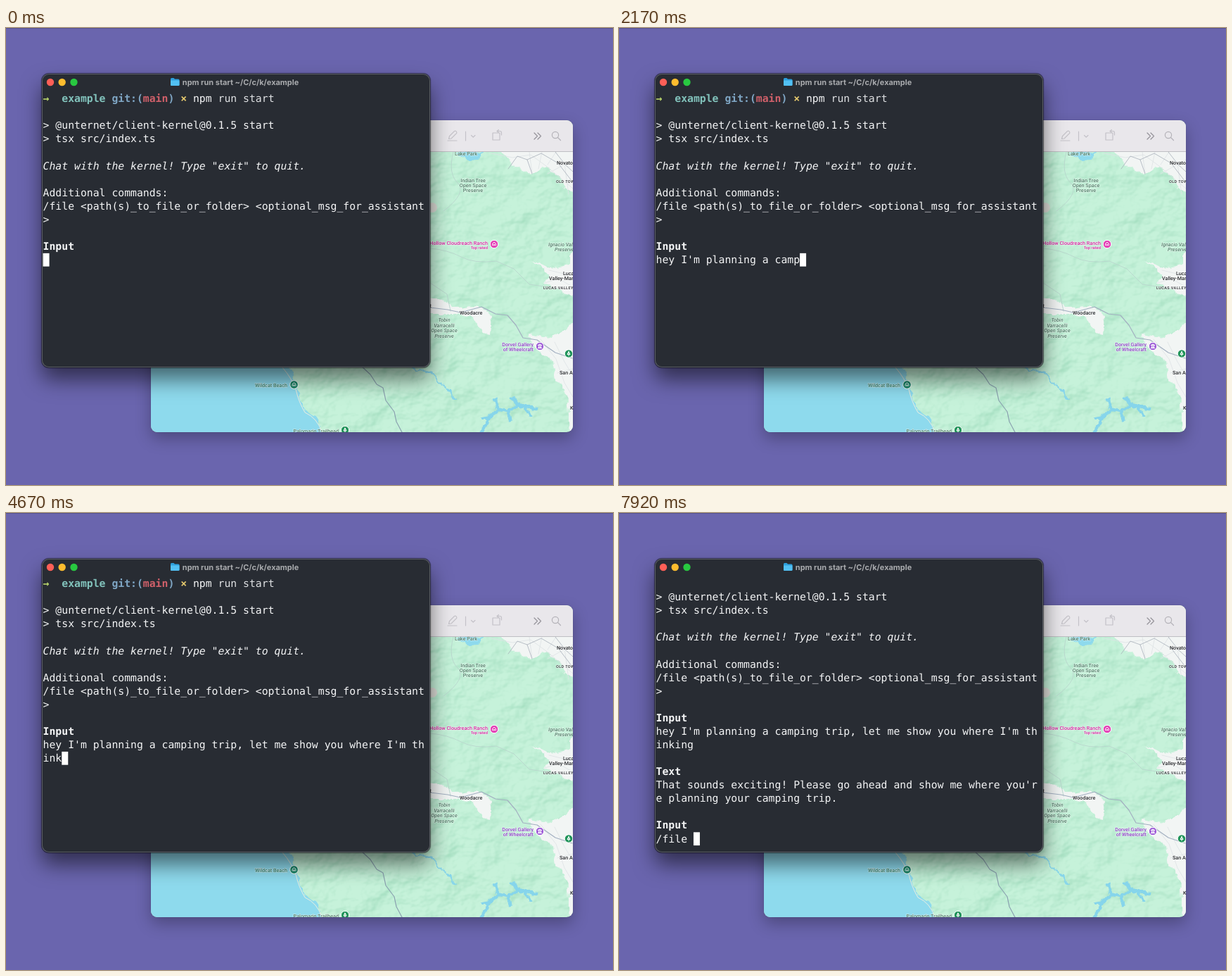
An HTML page that plays this animation: 863x649 px, repeating every 8000 ms.

```html
<!DOCTYPE html>
<html lang="en">
<head>
<meta charset="utf-8">
<title>Terminal chat</title>
<style>
  html, body { margin: 0; width: 100%; height: 100%; overflow: hidden; background: #6a65ae; }
  body { position: relative; box-shadow: inset 0 1px #55518c; }
  div { position: absolute; overflow: hidden; }
  svg { display: block; }
  text { text-rendering: geometricPrecision; white-space: pre; }
  #map { left: 206px; top: 131px; width: 599.5px; height: 443px; border-radius: 9px; background: #c6f2da;
    box-shadow: 0 0 1px rgba(0,0,0,.5), 0 9px 22px rgba(0,0,0,.28); will-change: transform; }
  #map text { font: 500 7.2px Roboto, sans-serif; stroke: #fff; stroke-opacity: .6; stroke-width: 1.2px; paint-order: stroke; }
  #map .it { font-style: italic; }
  #map .caps { font-size: 5.5px; letter-spacing: .4px; }
  .town { fill: #26292c; }
  .park { fill: #4d7d66; }
  .mid { text-anchor: middle; }
  .end { text-anchor: end; }
  .line { fill: none; stroke-linecap: round; stroke-linejoin: round; }
  #term { left: 51px; top: 65px; width: 551.5px; height: 417px; border-radius: 10px; background: #282c33;
    box-shadow: inset 0 0 0 1px #5b5f65, 0 0 1px 1px rgba(0,0,0,.55), 0 17px 30px rgba(0,0,0,.54); will-change: transform; }
  #term text { font: 14.77px "DejaVu Sans Mono", monospace; fill: #f4f5f6; }
  #term .b { font-weight: bold; }
  #term .i { font-style: italic; }
  #term .title { font: 700 10.95px Inter, sans-serif; fill: #a9abae; text-anchor: middle; }
</style>
</head>
<body>
<div id="map">
<svg width="600" height="443" viewBox="206 131 600 443">
  <defs>
    <filter id="hills" x="0" y="0" width="1" height="1" color-interpolation-filters="sRGB">
      <feTurbulence type="fractalNoise" baseFrequency=".022 .028" numOctaves="4" seed="8"/>
      <feDiffuseLighting surfaceScale="8" lighting-color="#fff">
        <feDistantLight azimuth="225" elevation="60"/>
      </feDiffuseLighting>
      <feColorMatrix values="0 0 0 0 .52  0 0 0 0 .8  0 0 0 0 .66  -.8 0 0 0 .74"/>
    </filter>
    <filter id="rough">
      <feTurbulence type="fractalNoise" baseFrequency=".09" numOctaves="3" seed="4"/>
      <feDisplacementMap in="SourceGraphic" scale="9" xChannelSelector="R" yChannelSelector="G"/>
    </filter>
  </defs>
  <rect x="206" y="176" width="600" height="398" filter="url(#hills)"/>

  <g fill="#f2f5f4" filter="url(#rough)">
    <path d="M696 170H815V240L797 230 788 212 768 196 746 207 722 196 714 184Z"/>
    <path d="M815 312L802 322 802 336 772 342 748 330 772 350 766 362 790 374 815 384Z"/>
    <path d="M600 384L620 386 636 397 674 396 690 408 688 436 676 432 664 412 640 406 600 406Z"/>
    <path d="M815 408L796 428 776 440 744 434 748 452 778 474 782 500 798 520 802 576H815Z"/>
  </g>
  <g class="line" stroke="#dde2e5" stroke-width=".8">
    <path d="M690 178l30 6 26-4 22 16 38 32M744 176l4 30M762 176l-5 24M782 176l-12 18M770 207l36-20M794 192l6 44"/>
    <path d="M772 344l34 8M766 362l20-6 20 12M760 442l22 28 12 34 12 20M780 446l14 28 12 20M784 490l22-6"/>
  </g>
  <g class="line" stroke="#a9b0ba" stroke-width=".8">
    <path d="M714 200l13-18 14 5 7 20M741 187l20-9 24 14 20 26M781 176l14 18 11 10"/>
  </g>
  <g class="line" stroke="#b9d6cd" stroke-width=".9">
    <path d="M603 313q25 2 44 12t50 6l25 11 22 22 40 6M636 176q-8 30 6 44t-20 40M603 362l24 16 5 24"/>
  </g>
  <g class="line" stroke="#a3b0c1" stroke-width="1.2">
    <path d="M603 397l25 3 18 4 30-8 20 10 17 2 12 14 10 18 20 3 26 18 24 8"/>
    <path d="M505 480l13 12 9 14 9 5 4 18 12 16 3 14 9 17" stroke="#8ba2b0"/>
  </g>

  <g fill="#8edaed" filter="url(#rough)">
    <path d="M190 470H396L407 490 413 508 418 528 428 546 444 556 450 576H190Z"/>
    <path d="M640 178L650 174 678 176 674 186 656 187Z"/>
  </g>
  <g class="line" stroke="#86d5eb" stroke-width="2" filter="url(#rough)">
    <path d="M572 480l16 6 18 4 13 16 13 10 6 14"/>
    <path d="M676 574l12-22 12-10 14 2 12-10 14 4 14 2M700 542l-4-14M726 534l-6-8M738 538l6 12M690 552l-12 2M714 544l4 12" stroke-width="4.5"/>
  </g>
  <path d="M393 482q13 15 19 31 4 18 13 33 18 8 24 28" class="line" stroke="#e9eee0"/>
  <circle cx="606" cy="255" r="7" fill="#e9d6d8" opacity=".7"/>

  <g class="park mid">
    <text x="654" y="181">Lake Park</text>
    <text x="664" y="218.5">Indian Tree</text>
    <text x="664" y="225.5">Open Space</text>
    <text x="664" y="232.5">Preserve</text>
    <text class="it" x="623" y="417">Tobin</text>
    <text class="it" x="623" y="425">Varracelli</text>
    <text class="it" x="623" y="432">Open Space</text>
    <text class="it" x="623" y="439.5">Preserve</text>
  </g>
  <g class="park">
    <text class="it" x="771" y="310">Ignacio Valley</text>
    <text class="it" x="780" y="317">Preserve</text>
    <text class="end" x="400" y="510" fill="#2f7f6b">Wildcat Beach</text>
    <text class="end" x="473" y="574.5">Palomarin Trailhead</text>
  </g>
  <g class="town">
    <text x="783" y="194">Novato</text>
    <text class="caps" x="782" y="220">OLD TOWN</text>
    <text x="792" y="351">Lucas</text>
    <text x="772" y="357.5">Valley-Marinwood</text>
    <text class="caps" x="764" y="371">LUCAS VALLEY</text>
    <text x="645" y="406.5">Woodacre</text>
    <text x="787" y="491.5">San Anselmo</text>
    <text x="802" y="541.5">Kentfield</text>
    <text class="end" x="605" y="396.5">Forest</text>
  </g>
  <g class="end" fill="#d3269f">
    <text x="685" y="307.5">Hollow Cloudreach Ranch</text>
    <text x="685" y="313.5" style="font-size:5.8px">Top rated</text>
  </g>
  <g class="end" fill="#8a3fc4">
    <text x="750" y="452">Dorvel Gallery</text>
    <text x="750" y="458.5">of Wheelcraft</text>
  </g>
  <g stroke="#fff">
    <circle cx="694" cy="307" r="5.7" fill="#e23cb4"/>
    <circle cx="759" cy="452" r="5.7" fill="#a05fd8"/>
    <circle cx="409.5" cy="506.5" r="5.8" fill="#178567"/>
    <circle cx="482" cy="571" r="5.7" fill="#21945a"/>
    <circle cx="800" cy="462.5" r="5.7" fill="#21945a"/>
  </g>
  <g class="line" stroke="#fff">
    <path d="M691.5 308.5q0-4 2.5-4t2.5 4M693 309l1-2 1 2M407 508q0-4 2.5-4t2.5 4M408.5 508.5l1-2 1 2"/>
    <path d="M756.5 450.5l2.5-1.5 2.5 1.5zM757.5 452v2M759 452v2M760.5 452v2M756.5 454.5h5"/>
    <path d="M482 574v-6l-2 4h4l-2-4M800 465.500v-6l-2 4h4l-2-4"/>
  </g>

  <path d="M206 131h600v45H206z" fill="#e9e7eb"/>
  <path d="M206 175.5h600" stroke="#bfbec3"/>
  <g class="line" stroke="#c4c2c8" stroke-width="1.2">
    <path d="M629.5 157.5l1-4 7-7q2-1 3 1t-1 3l-6.5 6.5zM628 160h13M653.5 147v13"/>
    <path d="M661.5 152.5l2.700 2.500 2.700-2.500M692 149h10v10h-10zM698 146.500h4.500q2 0 2 2.500v3M700.500 144.500l-2.500 2 2.500 2"/>
    <path d="M751 149l4.5 4.5-4.5 4.5M756 149l4.5 4.5-4.5 4.5" stroke="#929097"/>
    <circle cx="781" cy="152" r="4.6" stroke="#b4b2b8"/>
    <path d="M784.5 155.5l4 4" stroke="#b4b2b8"/>
  </g>
</svg>
</div>

<div id="term">
<svg width="552" height="417" viewBox="51 65 552 417">
  <circle cx="63" cy="77" r="5.2" fill="#ff5f57"/>
  <circle cx="79.7" cy="77" r="5.2" fill="#febc2e"/>
  <circle cx="96.5" cy="77" r="5.2" fill="#28c840"/>
  <path d="M234 72.5q0-1.5 1.5-1.5h3l1.5 1.5h5q1.5 0 1.5 1.5v6.5q0 1.5-1.5 1.5h-9.5q-1.5 0-1.5-1.5z" fill="#2d9fdc"/>
  <path d="M234 74.5h12.5v6q0 1.5-1.5 1.5h-9.5q-1.5 0-1.5-1.5z" fill="#52c0f3"/>
  <text class="title" x="333.5" y="80.5">npm run start ~/C/c/k/example</text>
  <text id="prompt" x="52.6" y="105.2"><tspan class="b" fill="#b9d56c">→  </tspan><tspan class="b" fill="#82c3bc">example </tspan><tspan class="b" fill="#7fa6c4">git:(</tspan><tspan class="b" fill="#d0606a">main</tspan><tspan class="b" fill="#7fa6c4">) </tspan><tspan class="b" fill="#e2c66d">× </tspan>npm <tspan fill="#dfe1e3">run start</tspan></text>
  <g id="rows"></g>
  <rect id="cursor" width="9" height="18.8" fill="#fff"/>
</svg>
</div>

<script>
const COLS = 61, ROWS = 20, LEFT = 52.6, TOP = 105.2, CELL = 8.89, PITCH = 19.07;
const LOOP = 96, FPS = 12;

// '*' marks a bold line, '_' an italic one; the first line is the prompt
const head = ['', '', '> @unternet/client-kernel@0.1.5 start', '> tsx src/index.ts', '',
  '_Chat with the kernel! Type "exit" to quit.', '', 'Additional commands:',
  '/file <path(s)_to_file_or_folder> <optional_msg_for_assistant', '>', '', '*Input'];
const message = "hey I'm planning a camping trip, let me show you where I'm thinking";
const reply = "That sounds exciting! Please go ahead and show me where you're planning your camping trip.";
const command = '/file ';

// [tick, letters shown]
const messageKeys = [[7, 0], [11, 4], [26, 23], [38, 40], [47, 53], [56, 64], [57, 66], [58, 67]];
const replyKeys = [[73, 0], [74, 11], [77, 11], [78, 37], [79, 74], [80, 90]];
const commandKeys = [[88, 0], [89, 1], [90, 1], [95, 6]];
const cursorOff = [[2, 6], [65, 70], [85, 89]];

const $ = id => document.getElementById(id);
const rows = Array.from({ length: ROWS }, (_, i) => {
  const row = document.createElementNS('http://www.w3.org/2000/svg', 'text');
  row.setAttribute('x', LEFT);
  row.setAttribute('y', TOP + i * PITCH);
  return $('rows').appendChild(row);
});

function typed(text, keys, tick) {
  const i = keys.findIndex(key => key[0] > tick);
  if (i === 0) return '';
  if (i < 0) return text;
  const [t0, n0] = keys[i - 1], [t1, n1] = keys[i];
  return text.slice(0, Math.floor(n0 + (n1 - n0) * (tick - t0) / (t1 - t0) + 1e-6));
}

const wrap = text => Array.from({ length: Math.floor(text.length / COLS) + 1 },
  (_, i) => text.slice(i * COLS, (i + 1) * COLS));

function draw(tick) {
  const lines = [...head, ...wrap(typed(message, messageKeys, tick))];
  if (tick >= 61) lines.push('');
  if (tick >= 73) lines.push('*Text', ...wrap(typed(reply, replyKeys, tick)));
  if (tick >= 80) lines.push('', '*Input', typed(command, commandKeys, tick));

  const scrolled = lines.length > ROWS;
  const shown = lines.slice(-ROWS);
  $('prompt').style.display = scrolled ? 'none' : '';
  rows.forEach((row, i) => {
    const line = shown[i] || '';
    const style = { '*': 'b', _: 'i' }[line[0]] || '';
    row.setAttribute('class', style);
    row.textContent = style ? line.slice(1) : line;
  });

  const last = shown.length - 1;
  $('cursor').setAttribute('x', LEFT + shown[last].length * CELL);
  $('cursor').setAttribute('y', TOP + last * PITCH - 14.2);
  $('cursor').style.display = cursorOff.some(([a, b]) => tick >= a && tick < b) ? 'none' : '';
}

let start, shownTick = -1;
function loop(now) {
  start ??= now;
  const tick = Math.floor((now - start) * FPS / 1000 + 1e-3) % LOOP;
  if (tick !== shownTick) draw(shownTick = tick);
  requestAnimationFrame(loop);
}
draw(0);
requestAnimationFrame(loop);
</script>
</body>
</html>
```
